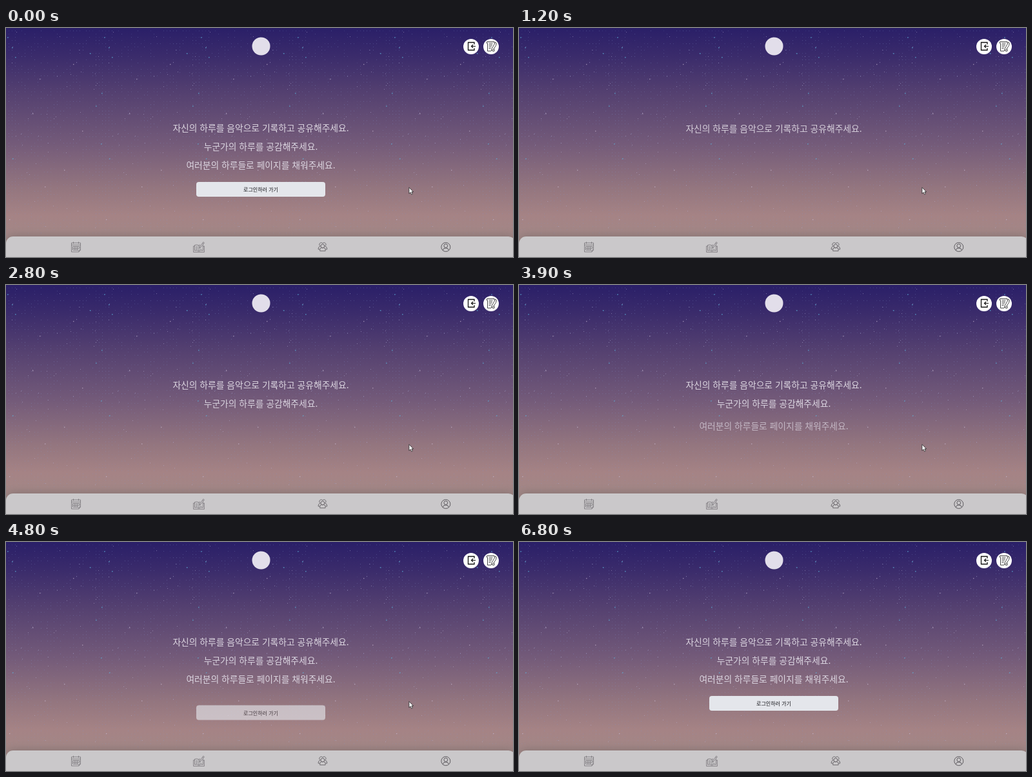
Recreate the animation shown at these times as an HTML page with a canvas. Size 786 by 357 pixels, loop 6.9 s.

```html
<!DOCTYPE html>
<html lang="ko">
<head>
<meta charset="utf-8">
<title>하루 음악 기록</title>
<style>
html, body { margin: 0; width: 100%; height: 100%; overflow: hidden; background: #2a1f68; }
#stage { position: absolute; left: 0; top: 0; width: 786px; height: 357px; overflow: hidden;
  font-family: "Noto Sans CJK KR", "Noto Sans KR", "Noto Sans CJK JP", "Noto Sans CJK", sans-serif; }
canvas { position: absolute; left: 0; top: 0; }
.line { position: absolute; left: 0; width: 790px; text-align: center; white-space: nowrap;
  font-family: "Noto Sans CJK KR Light", "Noto Sans CJK KR", "Noto Sans KR", "Noto Sans CJK JP", sans-serif;
  font-size: 13.8px; font-weight: 300; line-height: 20px; color: #dcd6e1; }
#login { position: absolute; left: 295px; top: 240px; width: 200px; height: 23px; border-radius: 4px;
  background: #e4e6eb; color: #17171c; text-align: center; font-size: 8px; font-weight: 500; line-height: 23px; }
</style>
</head>
<body>
<div id="stage">
  <canvas id="back" width="786" height="357"></canvas>
  <div class="line" style="top:145px">자신의 하루를 음악으로 기록하고 공유해주세요.</div>
  <div class="line" style="top:174px">누군가의 하루를 공감해주세요.</div>
  <div class="line" style="top:203px">여러분의 하루들로 페이지를 채워주세요.</div>
  <div id="login">로그인하러 가기</div>
  <canvas id="front" width="786" height="357"></canvas>
</div>
<script>
const W = 786, H = 357, LOOP = 6900, STEP = 100, RELOAD = 300;
const back = document.getElementById('back').getContext('2d');
const front = document.getElementById('front').getContext('2d');

const lines = document.querySelectorAll('.line');
const reveals = [
  { el: lines[0], start: 480, rise: 20 },
  { el: lines[1], start: 1980, rise: 20 },
  { el: lines[2], start: 3480, rise: 20 },
  { el: document.getElementById('login'), start: 4430, rise: 40 }
];

// time, x, y of the pointer
const path = [[5200, 624.4, 248], [5400, 691.4, 111], [5600, 731.4, 27], [5700, 746.4, 0]];

// CSS "ease" curve
function ease(x) {
  if (x <= 0) return 0;
  if (x >= 1) return 1;
  const bez = (a, b, u) => 3 * a * u * (1 - u) ** 2 + 3 * b * u * u * (1 - u) + u ** 3;
  let lo = 0, hi = 1;
  for (let i = 0; i < 24; i++) {
    const mid = (lo + hi) / 2;
    if (bez(0.25, 0.25, mid) < x) lo = mid; else hi = mid;
  }
  return bez(0.1, 1, lo);
}

function random(seed) {
  return () => (seed = (seed * 16807) % 2147483647) / 2147483647;
}

function disc(c, x, y, r, fill) {
  c.fillStyle = fill;
  c.beginPath();
  c.arc(x, y, r, 0, Math.PI * 2);
  c.fill();
}

function icon(c, d, x, y, color, width) {
  c.save();
  c.translate(x, y);
  c.strokeStyle = color;
  c.lineWidth = width;
  c.stroke(new Path2D(d));
  c.restore();
}

function drawSky(c) {
  const g = c.createLinearGradient(0, 0, 0, 325);
  [[0, '#2a1f68'], [0.13, '#3a2b6b'], [0.31, '#544070'], [0.55, '#735a79'],
   [0.77, '#94767f'], [0.9, '#a58385'], [1, '#a28786']].forEach(s => g.addColorStop(s[0], s[1]));
  c.fillStyle = g;
  c.fillRect(0, 0, W, H);
}

function drawStars(c) {
  const tile = 150, rnd = random(77);
  const dot = (x, y, color, size = 1) => {
    c.fillStyle = color;
    for (let px = x % tile; px < W; px += tile) c.fillRect(px, y, size, size);
  };
  // faint grid, denser around the tile seam
  for (let y = 4; y < 320; y += 5) {
    for (let x = 4; x < tile; x += 5) {
      const seam = Math.min(x, tile - x) < 16;
      if (rnd() < (seam ? 0.65 : 0.3)) dot(x, y, `rgba(130,150,205,${0.15 + rnd() * 0.22})`);
    }
  }
  for (let i = 0; i < 40; i++) {
    dot(Math.floor(rnd() * tile), Math.floor(rnd() * 315), 'rgba(185,180,215,.5)');
  }
  const bright = [[9, 30], [14, 45], [148, 101], [147, 180], [10, 203], [139, 121], [130, 39], [2, 14]];
  bright.forEach(p => dot(p[0], p[1], 'rgba(95,180,220,.65)', 1.6));
  const pale = [[41, 133], [52, 79], [60, 247], [104, 56], [90, 221], [5, 298], [118, 160]];
  pale.forEach(p => dot(p[0], p[1], 'rgba(205,190,215,.6)', 1.4));
}

function drawTop(c) {
  disc(c, 395.5, 28.5, 14, '#e2deea');
  disc(c, 721, 29, 12, '#fff');
  disc(c, 752, 29, 12, '#fff');
  icon(c, 'M10 3.5V.5H.5V12.5H10V9.5', 716, 22, '#111', 1.3);
  icon(c, 'M12 6.5H5.5M8 4L5.5 6.5L8 9', 716, 22, '#111', 1.2);
  const note = 'M13 3V1H1.5V3.5H2.5V15.5H8M13 12V15.5H10' +
    'M4.5 3.5H10.5M4.5 6H10M4.5 8.5H9M4.5 11H7.5' +
    'M14.5 1.5L16.3 3L15.5 7L11 13.5L8.5 15L9 12L13 5Z';
  icon(c, note, 744, 20.5, '#333', 0.9);
}

function drawBar(c) {
  c.save();
  c.shadowColor = 'rgba(70,70,70,.3)';
  c.shadowBlur = 14;
  c.shadowOffsetY = -2;
  c.fillStyle = '#cac8ca';
  c.beginPath();
  c.roundRect(0, 325, 790, 50, 11);
  c.fill();
  c.restore();

  const ink = '#757276';
  icon(c, 'M.5 2H14.5V13L12 16H.5ZM.5 5.2H14.5M3.5 .3V3.3M11.5 .3V3.3M14.5 13H12V16' +
    'M2.5 7.5H12.8M2.5 10.3H12.8M2.5 13.1H11M2.5 7.5V13.1M5.9 7.5V13.6M9.3 7.5V13.6M12.8 7.5V11',
    101, 333, ink, 0.8);
  icon(c, 'M9 6Q6 4.3 2.5 5.5V14Q6 13 9 15Q12 13 15.5 14V6M9 6V15M2.5 7H.6V16.4H17.4V7H15.5' +
    'M4.3 8H7.2M4.3 10H7.2M4.3 12H7.2M10.8 12H13.5M16 .6L17.4 2L12 9L10 10L10.6 7.8ZM14.5 2.5L16 3.8M9 6L11 5',
    290, 333, ink, 0.8);
  const people = 'M4.5 6.2A2.8 2.8 0 1 1 7.5 1.9A2.8 2.8 0 1 1 10.5 6.2' +
    'M4.6 6A2.9 2.9 0 0 1 10.4 6A2.9 2.9 0 0 1 4.6 6' +
    'M3.5 6.2Q.6 7 .6 11H3.3M11.5 6.2Q14.4 7 14.4 11H11.7' +
    'M3.3 11.5Q3.3 8.7 5.7 8.6H9.3Q11.7 8.7 11.7 11.5V13.6H3.3Z';
  icon(c, people, 483.4, 334, '#666367', 0.9);
  icon(c, 'M.5 7.5A7 7 0 0 1 14.5 7.5A7 7 0 0 1 .5 7.5M4.6 5.6A2.9 2.9 0 0 1 10.4 5.6A2.9 2.9 0 0 1 4.6 5.6' +
    'M2.9 12.6Q3.5 9 7.5 9Q11.5 9 12.1 12.6', 674.3, 334, '#5c595e', 1);
}

function pointerAt(t) {
  if (t <= path[0][0]) return path[0].slice(1);
  for (let i = 1; i < path.length; i++) {
    const [t0, x0, y0] = path[i - 1], [t1, x1, y1] = path[i];
    if (t <= t1) {
      const k = (t - t0) / (t1 - t0);
      return [x0 + (x1 - x0) * k, y0 + (y1 - y0) * k];
    }
  }
  return null;
}

const arrow = new Path2D('M.5 .5V10.2L2.7 8.2L4.2 11.5L5.9 10.7L4.4 7.5H7.2Z');
function drawPointer(c, t) {
  c.clearRect(0, 0, W, H);
  const p = pointerAt(t);
  if (!p) return;
  c.save();
  c.translate(p[0], p[1]);
  c.fillStyle = '#fff';
  c.strokeStyle = '#222';
  c.lineWidth = 0.8;
  c.fill(arrow);
  c.stroke(arrow);
  c.restore();
}

function render(t) {
  for (const { el, start, rise } of reveals) {
    const k = t < RELOAD ? 1 : ease((t - start) / 1000);
    el.style.opacity = k;
    el.style.transform = k === 1 ? 'none' : `translateY(${(1 - k) * rise}px)`;
  }
  drawPointer(front, t);
}

drawSky(back);
drawStars(back);
drawTop(back);
drawBar(back);

const begin = performance.now();
function tick() {
  const t = (performance.now() - begin) % LOOP;
  render(Math.floor(t / STEP) * STEP);
  requestAnimationFrame(tick);
}
render(0);
requestAnimationFrame(tick);
</script>
</body>
</html>
```
